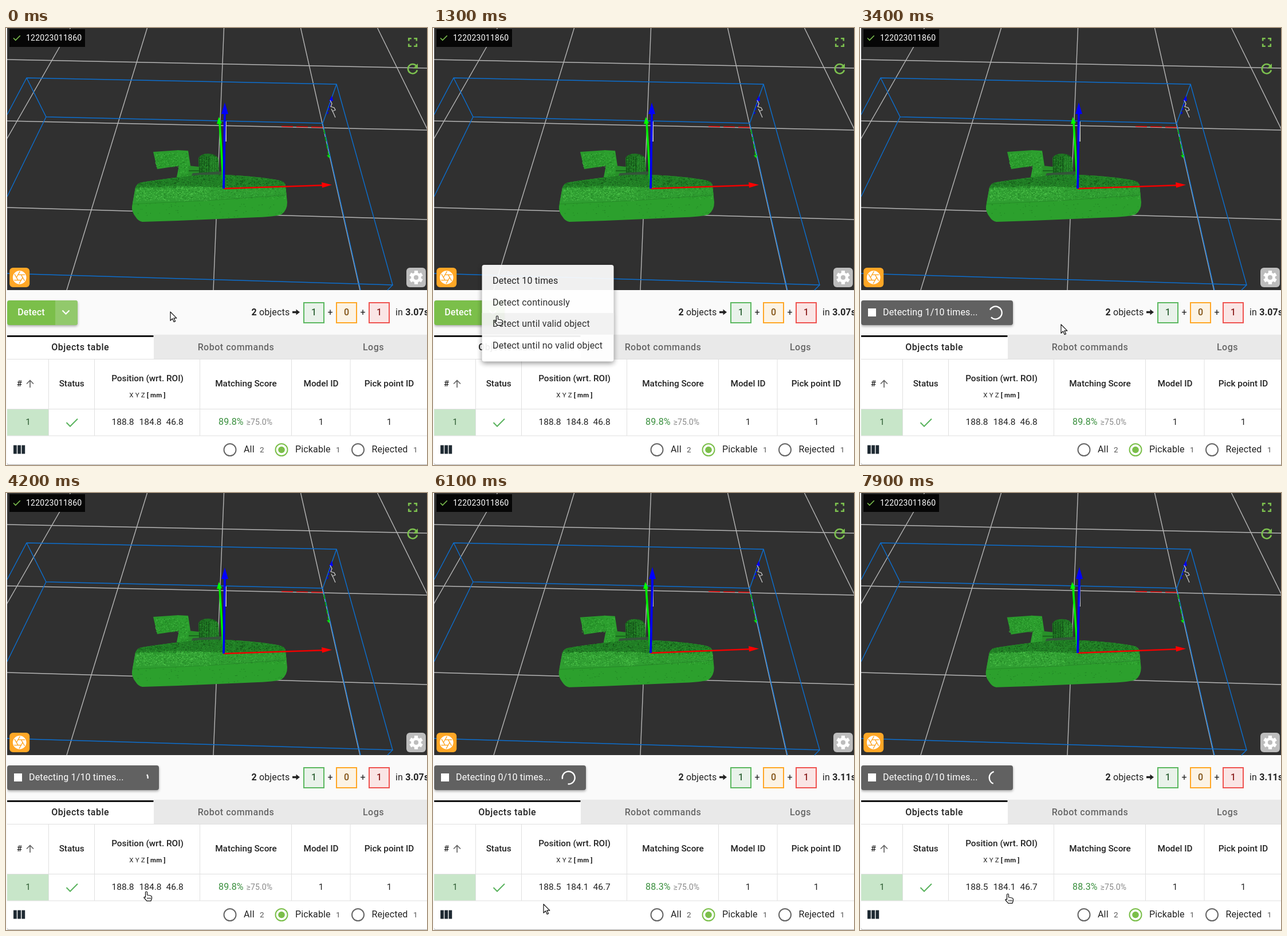
Write an HTML page with a canvas that moves like this. It is 735 by 762 pixels and loops after 8 s.

```html
<!DOCTYPE html>
<html lang="en">
<head>
<meta charset="utf-8">
<title>Object detection</title>
<style>
html, body { margin: 0; width: 100%; height: 100%; overflow: hidden; background: #fafafa; }
canvas, svg { position: absolute; left: 0; top: 0; width: 735px; height: 762px; }
text { font: 16px Roboto, "Noto Sans", sans-serif; fill: #222; letter-spacing: .15px; white-space: pre; }
.mid { text-anchor: middle; }
.med { font-weight: 500; }
.bold { font-weight: 700; }
.tab { font-weight: 500; letter-spacing: .5px; }
.off { fill: #666; }
.head { font-size: 15.3px; font-weight: 500; letter-spacing: 0; }
.num { font-size: 15.5px; letter-spacing: 0; }
.count { font-size: 13.5px; fill: #555; }
.line { fill: none; stroke-width: 2; }
.raised { filter: drop-shadow(0 2px 2px #0005); }
#menu { filter: drop-shadow(0 3px 5px #0007); }
</style>
</head>
<body>
<canvas id="scene" width="735" height="762"></canvas>
<svg viewBox="0 0 735 762">
  <!-- viewer overlay -->
  <rect x="6" y="2" width="132" height="31" fill="#060606"/>
  <path class="line" d="M13 17.5l3.7 3.8 8-8" stroke="#7cc04f" style="stroke-width:1.6"/>
  <text x="35" y="22" style="font-size:14px;letter-spacing:.25px;fill:#fff">122023011860</text>
  <g class="line" stroke="#7cc04f" style="stroke-width:2.6">
    <path d="M703.2 22.5v-4.3h4.6M712.2 18.2h4.6v4.3M716.8 27.5v4.3h-4.6M707.8 31.8h-4.6v-4.3"/>
    <path d="M716.5 66.2a8.2 8.2 0 1 0 1.4 7.2"/>
  </g>
  <path d="M719 62v8.4h-8.4z" fill="#7cc04f"/>
  <g transform="translate(23.7 435)">
    <rect x="-17.5" y="-17" width="35" height="34" rx="6" fill="#ffa726"/>
    <circle r="11.8" fill="#fff"/>
    <g id="iris" stroke="#ffa726" stroke-width="1.4"></g>
  </g>
  <g transform="translate(716 435)">
    <rect x="-17" y="-17" width="34" height="34" rx="6" fill="#bdbdbd"/>
    <circle r="8.8" fill="#fff"/>
    <g id="cog" stroke="#fff" stroke-width="6.2"></g>
    <circle r="4.1" fill="#bdbdbd"/>
  </g>

  <!-- toolbar -->
  <g id="idle">
    <rect class="raised" x="2" y="475" width="123" height="43" rx="4" fill="#7bbf4a"/>
    <path d="M86 475h35a4 4 0 0 1 4 4v35a4 4 0 0 1-4 4H86z" fill="#92c96c"/>
    <text class="mid med" x="44" y="501" style="fill:#fff">Detect</text>
    <path class="line" d="M98.5 492.5l6 6 6-6" stroke="#fff" style="stroke-width:2.2"/>
  </g>
  <g id="busy">
    <rect class="raised" x="2" y="475" width="265" height="43" rx="4" fill="#616161"/>
    <rect x="14" y="489" width="14" height="14" fill="#fff"/>
    <text id="progress" x="40" y="501" style="fill:#fff"></text>
    <g transform="translate(236.7 496.5) scale(.55)">
      <circle id="spinner" class="line" r="20" stroke="#fff" style="stroke-width:4.2"/>
    </g>
  </g>
  <text x="428.5" y="501"><tspan class="bold">2</tspan> objects</text>
  <path d="M500 493.8h6.5v-3.3l6.5 5-6.5 5v-3.3H500z" fill="#222"/>
  <g class="line">
    <rect x="520" y="479" width="35" height="35" fill="#e9f2ea" stroke="#5cb860"/>
    <rect x="577" y="479" width="35" height="35" fill="#fcf3e4" stroke="#ffa726"/>
    <rect x="634" y="479" width="35" height="35" fill="#fae5e5" stroke="#ef5350"/>
  </g>
  <g class="mid">
    <text class="med" x="537.5" y="501" style="fill:#33663a">1</text>
    <text x="566" y="501">+</text>
    <text class="med" x="594.5" y="501" style="fill:#835314">0</text>
    <text x="623" y="501">+</text>
    <text class="med" x="651.5" y="501" style="fill:#8e2424">1</text>
  </g>
  <text x="680" y="501">in <tspan class="bold" id="seconds"></tspan></text>

  <!-- table card -->
  <path class="raised" d="M2 536h740v225H6a4 4 0 0 1-4-4z" fill="#fff" style="filter:drop-shadow(0 1px 1.5px #0007)"/>
  <path d="M258 536h477v41H258z" fill="#e9e9e9"/>
  <path d="M2 536h255.500v2.800H2z" fill="#000"/>
  <path d="M2 664h73v47H2z" fill="#c8e6c9"/>
  <path d="M2 577.500h733M2 664.500h733M2 711h733M74.500 578v133M154.500 578v133M338.500 578v133M498.500 578v133M601 578v133" stroke="#e0e0e0"/>
  <g class="mid">
    <text class="tab" x="129.700" y="562">Objects table</text>
    <text class="tab off" x="401.500" y="562">Robot commands</text>
    <text class="tab off" x="641.500" y="562">Logs</text>
    <text class="head" x="23.500" y="625">#</text>
    <text class="head" x="114.700" y="625">Status</text>
    <text class="head" x="247" y="616">Position (wrt. ROI)</text>
    <text class="head" x="419" y="625">Matching Score</text>
    <text class="head" x="550" y="625">Model ID</text>
    <text class="head" x="669" y="625">Pick point ID</text>
    <text x="247" y="644" style="font-size:11.500px">X Y Z <tspan class="bold">[ mm ]</tspan></text>
    <text class="num" x="38.500" y="692" style="fill:#2c5a30">1</text>
    <text class="num" x="550" y="692">1</text>
    <text class="num" x="669" y="692">1</text>
  </g>
  <path class="line" d="M42 627v-12M36 620.500l6-6 6 6" stroke="#666" style="stroke-width:1.700"/>
  <path class="line" d="M105.500 688l6.500 6.500 13-13" stroke="#58b25c"/>
  <text class="num" id="px" x="184.500" y="692"></text>
  <text class="num" id="py" x="232.500" y="692"></text>
  <text class="num" id="pz" x="279.500" y="692"></text>
  <text id="score" x="371" y="692" style="fill:#388e3c"></text>
  <text x="419.500" y="692" style="font-size:14px;fill:#888">≥75.0%</text>

  <!-- footer -->
  <path d="M13 727.500h5.800v15H13zM20.200 727.500H26v15h-5.800zM27.400 727.500h5.800v15h-5.800z" fill="#1f2a33"/>
  <g class="line" stroke="#666">
    <circle cx="391" cy="735.500" r="10.500"/>
    <circle cx="481" cy="735.500" r="10.500" stroke="#7bbf4a"/>
    <circle cx="614.500" cy="735.500" r="10.500"/>
  </g>
  <circle cx="481" cy="735.500" r="5.800" fill="#7bbf4a"/>
  <text x="415" y="740">All</text><text class="count" x="443" y="740">2</text>
  <text x="505" y="740">Pickable</text><text class="count" x="576" y="740">1</text>
  <text x="638.500" y="740">Rejected</text><text class="count" x="711" y="740">1</text>
  <path d="M0 0h2v762H0z" fill="#fafafa"/>

  <g id="menu">
    <rect x="85.500" y="413" width="230" height="168.500" rx="4" fill="#fff"/>
    <rect id="hover" x="85.500" width="230" height="37.700" fill="#f2f2f2"/>
    <g id="items">
      <text x="104" y="445">Detect 10 times</text>
      <text x="104" y="482.700">Detect continously</text>
      <text x="104" y="520.400">Detect until valid object</text>
      <text x="104" y="558.100">Detect until no valid object</text>
    </g>
  </g>
  <g id="cursor" fill="#fff" stroke="#111" stroke-width="1.200" stroke-linejoin="round">
    <path id="arrow" d="M0 0v15.200l3.600-3.400 2.600 5.700 2.400-1.100-2.600-5.500h4.800z"/>
    <path id="hand" d="M-1.500 9V1.500a1.500 1.500 0 0 1 3 0V6l5.500 1q2.500.600 2.500 2.800V12l-1.500 4.300H.800L-4.200 10.500q.8-2 2.700-.5zM2 13v-2.500M4.500 13v-2.500M7 13v-2.500"/>
  </g>
</svg>
<script>
const LOOP = 8000, STEP = 100;
const $ = id => document.getElementById(id);
const ctx = $('scene').getContext('2d');

// time, tip x, tip y
const path = [
  [0, 287, 495], [300, 235, 490], [600, 150, 485], [800, 107, 494], [900, 112, 502],
  [1900, 112, 502], [2300, 135, 440], [3300, 135, 440],
  [3400, 351, 517], [3800, 304, 612], [4200, 245, 695], [4900, 215, 718], [5100, 194, 717],
  [6100, 193, 717], [6500, 190, 716], [6900, 193, 716], [7800, 213, 703], [7900, 258, 699]
];

const results = [
  { seconds: '3.07s', px: '188.8', py: '184.8', pz: '46.8', score: '89.8%', progress: 'Detecting 1/10 times...' },
  { seconds: '3.11s', px: '188.5', py: '184.1', pz: '46.7', score: '88.3%', progress: 'Detecting 0/10 times...' }
];

for (let a = 0; a < 360; a += 60) {
  $('iris').innerHTML += `<path d="M-3 -4.700L9.500 -4.700" transform="rotate(${a})"/>`;
  $('cog').innerHTML += `<path d="M0 0V-11.800" transform="rotate(${a})"/>`;
}

function random(seed) {
  return () => (seed = (seed * 16807) % 2147483647) / 2147483647;
}

function poly(points, fill) {
  ctx.beginPath();
  for (let i = 0; i < points.length; i += 2) ctx.lineTo(points[i], points[i + 1]);
  ctx.closePath();
  ctx.fillStyle = fill;
  ctx.fill();
}

function line(color, width, ...p) {
  ctx.strokeStyle = color;
  ctx.lineWidth = width;
  ctx.beginPath();
  for (let i = 0; i < p.length; i += 2) ctx.lineTo(p[i], p[i + 1]);
  ctx.stroke();
}

function speckle(rnd, n, x, y, w, h, colors) {
  for (let i = 0; i < n; i++) {
    ctx.fillStyle = colors[Math.floor(rnd() * colors.length)];
    ctx.fillRect(x + rnd() * w, y + rnd() * h, 1 + rnd(), 1);
  }
}

function bodyPath() {
  const p = new Path2D('M226 278Q229 270 238 269Q290 261 322 258Q355 254 400 257Q450 260 478 266Q487 268 488 275' +
    'L491 304Q491 318 481 325Q470 329 440 330L300 336L238 338Q231 337 226 329Q219 320 220 311Z');
  return p;
}

function drawGrid() {
  ctx.fillStyle = '#303030';
  ctx.fillRect(0, 0, 735, 457);
  [[2, 55, 735, 70], [2, 162, 735, 178], [2, 313, 735, 334]].forEach(p => line('#b5b5b5', 1.4, ...p));
  for (let i = -2; i <= 2; i++) line('#b5b5b5', 1.4, 380.5 + 134 * i, 0, 362 + 256 * i, 457);
  const blue = '#0c6fd0';
  line(blue, 1.4, 2, 151, 36, 87, 577, 98, 675, 448, 2, 428);
  line(blue, 1.4, 36, 87, 70, 155, 553, 166, 577, 98);
  line(blue, 1.4, 70, 155, 2, 294);
  line(blue, 1.4, 553, 166, 619, 457);
  line(blue, 1.4, 675, 448, 666, 457);
  // ROI frame
  ctx.setLineDash([20, 6]);
  line('#e00000', 1.6, 553, 173, 481, 171.5);
  ctx.setLineDash([8, 5]);
  line('#00b000', 1.6, 555, 177, 563, 221);
  ctx.setLineDash([4, 3]);
  line('#0000f0', 2, 561, 150, 569, 122);
  ctx.setLineDash([]);
  poly([564, 127, 569, 118, 571, 127], '#0000ff');
  poly([560, 222, 566, 221, 564, 227], '#00e000');
  line('#c8c8c8', 1.3, 566, 126, 569, 132, 567, 137, 573, 139, 575, 143, 570, 145, 568, 141, 572, 149, 575, 156);
}

function drawModel(version) {
  const rnd = random(911 + version * 7001);
  const mixed = ['#1f7d22', '#35ab35', '#268f28', '#48b948'];
  const dark = ['#124c16', '#1c6e20', '#23842a', '#2e9a30'];
  ctx.save();
  if (version > 1) ctx.translate(-.3, .7);

  poly([257, 216, 301, 213, 304, 240, 264, 246], '#2a9a2c');
  speckle(rnd, 260, 260, 217, 40, 25, mixed);
  poly([299, 213, 318, 214, 322, 240, 319, 262, 298, 260, 302, 240], '#2c9f2e');
  speckle(rnd, 150, 302, 217, 15, 42, mixed);
  poly([319, 240, 337, 242, 337, 259, 318, 259], '#289029');
  line('#1a651d', 2, 319, 249, 337, 249);
  ctx.save();
  ctx.clip(new Path2D('M336 227Q340 219 353 219Q367 219 371 229L372 257H337Z'));
  ctx.fillStyle = '#1f7422';
  ctx.fillRect(335, 217, 40, 42);
  for (let x = 338; x < 374; x += 4) line(x > 356 ? '#2b8f2e' : '#145019', 1.5, x, 224, x, 256);
  speckle(rnd, 260, 337, 219, 35, 37, dark);
  ctx.restore();
  poly([326, 253, 376, 250, 382, 259, 322, 261], '#34553a');

  ctx.save();
  ctx.clip(bodyPath());
  ctx.fillStyle = '#2ca02d';
  ctx.fillRect(215, 250, 280, 92);
  poly([215, 279, 270, 273, 360, 275, 495, 272, 495, 292, 350, 301, 215, 306], '#2f9d31');
  poly([215, 280, 240, 250, 495, 250, 495, 276, 380, 278, 300, 275], '#217f25');
  speckle(rnd, 1500, 228, 254, 260, 24, dark);
  speckle(rnd, 900, 226, 276, 262, 22, mixed);
  speckle(rnd, 480, 227, 276, 130, 25, ['#55cc50', '#46b945', '#3cad3c']);
  speckle(rnd, 260, 385, 258, 98, 22, dark);
  speckle(rnd, 70, 224, 304, 262, 26, ['#1f7d22', '#248b27']);
  ctx.globalAlpha = .6;
  line('#237f26', 1.2, 220, 307, 350, 301, 492, 291);
  ctx.restore();
  ctx.restore();
}

function drawAxes(moved) {
  const oy = moved ? 279 : 280, dx = moved ? 1 : 0, ry = moved ? 271.5 : 273.5;
  line('#c8c8c8', 2, 384, 163, 384, 198);
  line('#00ee00', 3.6, 380, oy, 373 - dx, 165);
  poly([371.5 - dx, 155, 377 - dx, 166, 368 - dx, 167.5], '#00ff00');
  line('#f00000', 2.6, 380, oy, 553, ry + .7);
  poly([551, ry - 4.5, 569, ry, 552, ry + 5], '#ff0000');
  line('#0000f0', 4, 380, oy, 382 + dx, 148);
  poly([382 + dx, 130 - dx, 388 + dx, 150, 376 + dx, 150], '#0000ff');
}

let drawn = '';
function drawScene(version, moved) {
  const key = version + '/' + moved;
  if (key === drawn) return;
  drawn = key;
  drawGrid();
  drawModel(version);
  drawAxes(moved);
}

function cursorAt(t) {
  const i = path.findIndex(p => p[0] > t);
  if (i < 0) return path[path.length - 1].slice(1);
  const [t0, x0, y0] = path[i - 1], [t1, x1, y1] = path[i], k = (t - t0) / (t1 - t0);
  return [x0 + (x1 - x0) * k, y0 + (y1 - y0) * k];
}

// ease-in-out, cubic-bezier(.42, 0, .58, 1)
function ease(x) {
  let lo = 0, hi = 1, s = .5;
  for (let i = 0; i < 20; i++) {
    s = (lo + hi) / 2;
    const bx = 3 * s * (1 - s) * (.42 * (1 - s) + .58 * s) + s ** 3;
    if (bx < x) lo = s; else hi = s;
  }
  return s * s * (3 - 2 * s);
}

function drawSpinner(t) {
  const p = ((t - 3400) / 1400 + 10.55) % 1;
  const grow = ease(Math.min(1, p * 2)), slide = p > .5 ? ease(p * 2 - 1) : 0;
  $('spinner').setAttribute('stroke-dasharray', `${1 + 99 * grow} 200`);
  $('spinner').setAttribute('stroke-dashoffset', -15 * grow - 110 * slide);
  $('spinner').setAttribute('transform', `rotate(${450 * p - 90})`);
}

const show = (id, on) => { $(id).style.display = on ? '' : 'none'; };

function render(t) {
  const busy = t >= 3400, menu = t >= 1200 && !busy, done = t >= 5600;
  drawScene([4500, 5600, 7300].filter(s => t >= s).length, done);
  show('idle', !busy);
  show('busy', busy);
  show('menu', menu);
  drawSpinner(t);

  const values = results[done ? 1 : 0];
  for (const id in values) if ($(id).textContent !== values[id]) $(id).textContent = values[id];

  const [x, y] = cursorAt(t);
  const overButton = !busy && x < 125 && y > 475 && y < 518;
  const overRow = y > 664 && y < 711;
  const hand = menu || overButton || overRow;
  show('hand', hand);
  show('arrow', !hand);
  $('cursor').setAttribute('transform', `translate(${Math.round(x)} ${Math.round(y)})`);

  $('menu').style.opacity = t < 1300 ? .5 : t < 1400 ? .93 : 1;
  $('items').setAttribute('transform', `translate(0 ${t < 1700 ? 1 : 0})`);
  $('hover').setAttribute('y', 421.500 + 37.7 * Math.floor((y - 421.5) / 37.7));
}

function tick() {
  render(Math.floor(performance.now() % LOOP / STEP) * STEP);
  requestAnimationFrame(tick);
}
tick();
</script>
</body>
</html>
```
